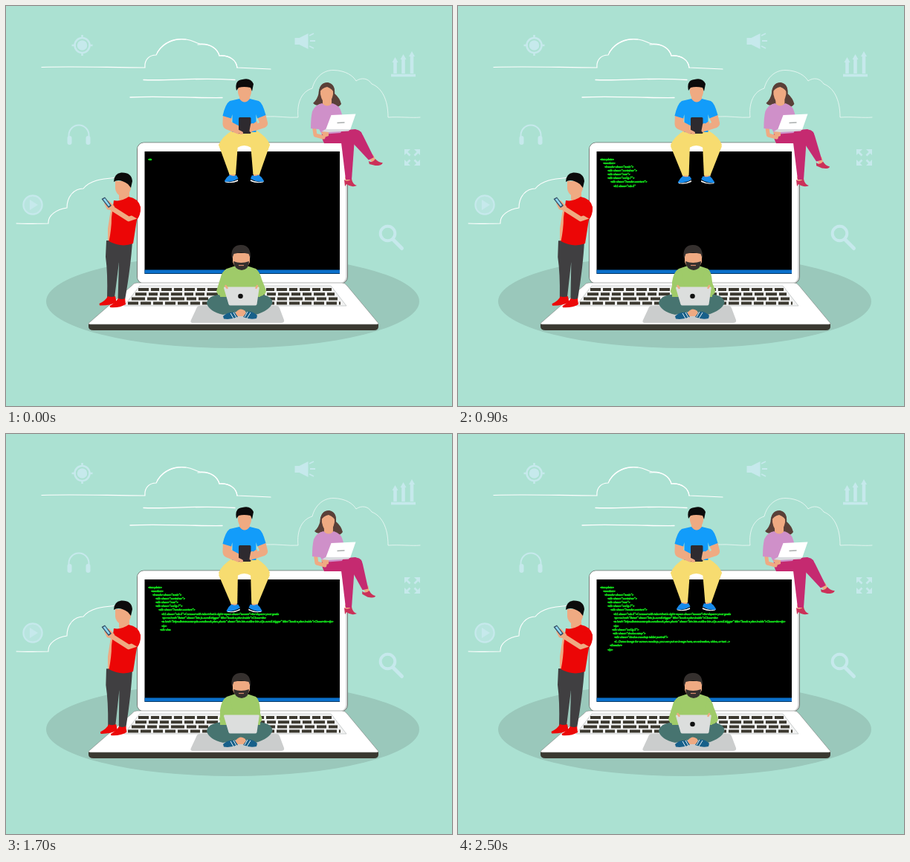
Recreate the animation shown at these times as an HTML page. Size 600x539 px, loop 2600 ms.

```html
<!DOCTYPE html>
<html lang="en">
<head>
<meta charset="utf-8">
<title>People around a laptop</title>
<style>
  html, body { margin: 0; width: 100%; height: 100%; overflow: hidden; background: #abe1d2; }
  svg { display: block; width: 100%; height: 100%; --k: 0; }
  .line { fill: none; stroke: #fff; stroke-linecap: round; stroke-linejoin: round; }
  .icon { fill: #c6e9ec; stroke: none; }
  .iconline { fill: none; stroke: #c6e9ec; }
  .skin { fill: #efaa82; }
  .skinline { fill: none; stroke: #efaa82; stroke-linecap: round; stroke-linejoin: round; }
  .keys { fill: none; stroke: #3b382f; stroke-width: 4; }
  .code { font: italic bold 4.2px "Liberation Sans", Arial, sans-serif; letter-spacing: -.36px; fill: #14e81c; stroke: #14e81c; stroke-width: .3px; white-space: pre; }
  .pants { fill: #c52a70; }
  .typing .mark { display: none; }
  .shinL { transform-origin: 291px 186px; transform: translateY(calc(var(--k) * 3.4px)) rotate(calc(var(--k) * -4deg)); }
  .shinR { transform-origin: 350px 186px; transform: translateY(calc(var(--k) * 3.4px)) rotate(calc(var(--k) * 4deg)); }
  .kick { transform-origin: 473px 175px; transform: rotate(calc(var(--k) * 18deg)); }
  .torso { transform: translateX(calc(var(--k) * 2.5px)); }
  .stance { transform-origin: 152px 318px; transform: rotate(calc(var(--k) * -1.2deg)); }
  .armL { transform: translateX(calc(var(--k) * 5px)); }
  .armR { transform: translateX(calc(var(--k) * -7px)); }
</style>
</head>
<body>
<svg id="stage" viewBox="0 0 600 539">
  <rect width="600" height="539" fill="#abe1d2"/>

  <!-- clouds -->
  <g class="line">
    <path stroke-width="1.2" d="M48 82.500C95 81 140 83 187 83C186 72 193 66 202 66C208 52 224 43 242 45C252 46 259 52 263 51C276 51 285 58 287 67C300 66 310 73 311 83L356 85"/>
    <path stroke-width="1.2" d="M204 62C212 49 226 43 242 45M258 52C274 50 284 57 287 67C301 66 310 73 311 83"/>
    <path stroke-width="1.3" d="M185 99.500C220 101 260 96 308 99.500M167 123C205 121 250 124 291 123.500"/>
    <path stroke-width="1" opacity=".65" d="M350 149C365 148 380 151 393 150C391 130 398 115 412 111C416 95 428 86 441 86.500C457 87 467 94 471 101C478 96 487 97 492 105C505 110 514 125 514 150C530 149 545 151 557 150"/>
    <path stroke-width="1.1" d="M14 293C30 294 42 293 57 293C56 282 68 274 82 272C82 256 92 246 104 246C114 234 130 233 150 231"/>
  </g>

  <!-- icons -->
  <g class="iconline" stroke-width="2.6">
    <circle cx="102.500" cy="53" r="10"/>
    <path d="M102.500 39v5M102.500 62v5M88.500 53h5M111.500 53h5"/>
    <circle cx="36" cy="268" r="12.500" stroke-width="2.400"/>
    <path d="M84.500 178v-4a13.500 13.500 0 0 1 27 0v4" stroke-width="2"/>
    <circle cx="513.500" cy="306.500" r="9.800" stroke-width="4"/>
    <path d="M521 315l11.500 11.500" stroke-width="5" stroke-linecap="round"/>
    <path d="M518 93.500h33" stroke-width="3.600"/>
    <path d="M523.500 91v-16M534.500 91v-20M546 91v-24" stroke-width="4.600"/>
    <path d="M408 40l6-3M409 47h7M408 54l6 3" stroke-width="1.800"/>
    <path d="M538 196l5.500 5.500M555 196l-5.500 5.500M538 213l5.500-5.500M555 213l-5.500-5.500" stroke-width="2.600"/>
  </g>
  <g class="icon">
    <circle cx="102.500" cy="53" r="6.800"/>
    <circle cx="36" cy="268" r="11.500" opacity=".5"/>
    <path d="M32 261l11 7-11 7z"/>
    <rect x="82.500" y="175" width="6" height="12" rx="3"/><rect x="107.500" y="175" width="6" height="12" rx="3"/>
    <path d="M388.500 43h6l12-6v21l-12-6h-6z"/>
    <path d="M519.500 76l4-7 4 7zM530.500 72l4-7 4 7zM542 68l4-7 4 7z"/>
    <path d="M536 193h8l-8 8zM557 193v8l-8-8zM536 215v-8l8 8zM557 215h-8l8-8z"/>
  </g>

  <ellipse cx="305" cy="398" rx="251" ry="63" fill="#9ac8bb"/>

  <!-- laptop -->
  <rect x="176.500" y="184" width="283" height="190" rx="9" fill="#d5d8d8" stroke="#6d706c" stroke-width=".9"/>
  <rect x="177" y="184.500" width="280" height="189" rx="8.500" fill="#fff"/>
  <rect x="186.500" y="196" width="262.500" height="165" fill="#000"/>
  <rect x="186.500" y="355.500" width="262.500" height="5" fill="#0b70cc"/>
  <path d="M111 428h390v4q0 5-6 5H118q-7 0-7-5z" fill="#3a3931"/>
  <path d="M176 373H452q4 0 7 4L501 427.500q0 1.500-3 1.500H114q-3 0-3-1.500L169 377q3-4 7-4z" fill="#fff" stroke="#7b7f7b" stroke-width=".6"/>
  <path d="M180 377H437L458 404H159z" fill="#f1f2f2" stroke="#bfc3c3" stroke-width=".8"/>
  <g class="keys">
    <path d="M178 382H438" stroke-dasharray="14 3 11 3"/>
    <path d="M174 388.200H442" stroke-dasharray="15 3 12 3 12 3"/>
    <path d="M169 394.400H446" stroke-dasharray="18 3 13 3 13 3"/>
    <path d="M164 400.600H450" stroke-dasharray="14 3 14 3 13 3"/>
  </g>
  <path d="M261 404H363q4 0 5 3l6 16q1 4-4 4H252q-5 0-3-4l7-15q1-4 5-4z" fill="#cbcdcd"/>

  <g id="code"></g>

  <!-- man on the left of the lid -->
  <g>
    <path class="skinline" stroke-width="5" d="M143 278L139.500 300V317"/>
    <g class="stance">
      <path fill="#403f41" d="M135 316L170 317Q168 350 160 396H150.500L152 345L146 393H136Q137 360 134 338Z"/>
      <path fill="#ec0808" d="M125.500 401Q134 397 137 391Q142 393 147 391L148.500 399Q140 404 126 403.500Z"/>
      <path fill="#ec0808" d="M139.500 404Q147 400 151 394Q156 396 160 394L161 402Q153 407 140 406Z"/>
    </g>
    <path class="skin" d="M152 248H166V262Q158 268 152 261Z"/>
    <path fill="#ec0606" d="M145 262Q155 264 165 257Q178 259 181 271Q181 280 176 288L171 320Q155 326 138.500 317Q142 300 142 285Z"/>
    <path class="skinline" stroke-width="6.500" d="M174 284L165 287L143 273"/>
    <path fill="#ec0606" d="M166 268Q180 262 181 273Q181 281 177 287L165 280Z"/>
    <path class="skin" d="M132 266L138 262L146 270L144 276L136 274Z"/>
    <path fill="#324c63" d="M128.500 260L133 257.500L142 269L138 272Z"/>
    <path fill="#8dd5f0" d="M130.500 260.500L133 259L140 268.500L138 270Z"/>
    <path class="skin" d="M147 236H168V246Q165 257 156 257Q148 254 147 246Z"/>
    <path fill="#0c0b0b" d="M145 237Q145 226 155 224.500Q169 224 170 236L168 245L164 240Q152 232 145 237Z"/>
  </g>

  <!-- man on top of the lid -->
  <g>
    <g class="shinL">
      <path class="skin" d="M300 224h8.500v7h-7.500z"/>
      <path fill="#f7dc70" d="M286 187Q292 178 312 186L309 227H300.500Z"/>
      <path fill="#fff" d="M294.500 236Q303 239 312 234V236Q304 239.500 295 237.500Z"/>
      <path fill="#168aeb" d="M294 235.500Q297 230 301 227.500Q305 230 310 228L312.500 232.500Q305 237.500 294 236.500Z"/>
    </g>
    <g class="shinR">
      <path class="skin" d="M333 224h8.500l-1 7h-7.500z"/>
      <path fill="#f7dc70" d="M355 187Q349 178 329 186L332.500 227H341Z"/>
      <path fill="#fff" d="M347 236Q338 239 329 234V236Q337 239.500 346 237.500Z"/>
      <path fill="#168aeb" d="M347 235.500Q344 230 340 227.500Q336 230 331 228L329 232.500Q336 237.500 347 236.500Z"/>
    </g>
    <path fill="#f7dc70" d="M304 168H337Q351 176 355 187L350 198L330 191Q325 188 320.500 188Q316 188 311 191L290 197L286 187Q291 176 304 168Z"/>
    <path class="skin" d="M314 118H328V127Q321 134 314 127Z"/>
    <path class="skin" d="M292 146L304 150L303 158L315 165L313 173L296 166Q291 163 291.500 158ZM349 145L338 150L341 157L328 163L329 170L348 164Q353 161 352 157Z"/>
    <path fill="#129cfa" d="M314 125Q321 134 328 125L340 128Q345 130 349.500 147L338 151.500L336.500 146V170H304.500V146L303 151.500L291.500 148Q295 132 301 128Z"/>
    <path class="skin" d="M303 156L316 163V173L303 169ZM338 155L327 162V170L339 167Z"/>
    <rect x="313" y="150" width="16.500" height="22" rx="1.500" fill="#2e2a2f"/>
    <path class="skinline" stroke-width="4" d="M312 168.500L317 171M331 160L329.500 168"/>
    <path class="skin" d="M312 106H330V117Q328 127 321 127.500Q314 127 312 117Z"/>
    <path fill="#0c0b0b" d="M310 114Q307 100 318 99Q329 96 333 105L331 115L329 110Q320 108 313 110Z"/>
  </g>

  <!-- woman on the corner of the lid -->
  <g>
    <path class="skin" d="M456 230h9v8h-8z"/>
    <path class="pants" d="M450 176L469 178L465 234H457Z"/>
    <path fill="#cb3159" d="M455 234Q459 238 465 233Q466 240 472 242Q465 245 458 240L456 243Z"/>
    <g class="kick">
      <path class="skin" d="M487 203l7-3 4 9-5 2z"/>
      <path class="pants" d="M464 172Q474 162 480 174L495 204L488 207.500L466 184Z"/>
      <path fill="#cb3159" d="M488 209Q493 212 497 206Q501 211 507 211Q506 215 497 215L489 213Z"/>
    </g>
    <path class="pants" d="M425 170Q445 168 470 166Q480 168 479 176Q477 183 468 185L428 185Q424 178 425 170Z"/>
    <g class="torso">
      <path class="skinline" stroke-width="5" d="M414 160L416 174L427 177"/>
      <path fill="#5a4038" d="M421 116Q422 103 433 103Q443 105 442 118Q449 124 451 132Q446 139 439 135L422 132Q418 136 413 131Q419 126 421 116Z"/>
      <path class="skin" d="M426 122H438V133Q431 139 426 133Z"/>
      <path fill="#cf90c9" d="M425 131Q432 138 439 131Q449 134 451 143L456 160L450 171L425 173L421 166L410 165Q410 150 412 142Q416 133 425 131Z"/>
      <path class="skin" d="M423 112Q431 104 440 113V119Q438 130 431 131Q425 130 423 119Z"/>
      <path fill="#5a4038" d="M420.500 118Q421 104 432 103.500Q443 105 442 119Q440 112 432 109Q425 110 420.500 118Z"/>
    </g>
    <path class="skin" d="M424 170l10-2v7l-6 2z"/>
    <path fill="#fff" d="M437.500 147L470.500 145.500L463 167H430Z"/>
    <path fill="#d9dcdf" d="M425 169L430 166H463L461 168.500L434 170Z"/>
    <path d="M445.500 157.500l10-.500" stroke="#a9adad" stroke-width="1.300"/>
  </g>

  <!-- man sitting in front -->
  <g>
    <path fill="#477470" d="M294 388Q272 389 270 400Q272 411 292 416L316 411L336 416Q355 410 358.500 400Q358 389 337 388Z"/>
    <path class="skin" d="M309 413Q315 405 322 411L323 418H309Z"/>
    <path fill="#17608a" d="M292 418Q298 412 308 413L312 419Q302 423 293 421.500ZM338 417Q332 411 324 412L319 419Q328 423 337 421Z"/>
    <path d="M302 414l4 7M306 413l4 7M329 413l-5 8M325 412l-4 7" stroke="#fff" stroke-width=".9"/>
    <path fill="#9fcb69" d="M309 350H324L336 354Q341 357 342 372V392H288V372Q290 358 297 354Z"/>
    <path class="armL" fill="#9fcb69" d="M297 354Q290 358 288 368L283 384Q284 390 291 391L304 389Z"/>
    <path class="armR" fill="#9fcb69" d="M336 354Q342 359 344 368L350 383Q350 389 343 391L329 389Z"/>
    <path class="skin" d="M311 346H322V351Q317 357 311 351Z"/>
    <path class="skin" d="M305 333H328V345Q325 354 316.500 354Q308 354 305 345Z"/>
    <path fill="#35302e" d="M306 344Q316 348 327 344Q327 355 317 356Q307 355 306 344Z"/>
    <path d="M313 349.500h7" stroke="#d98b6c" stroke-width="1.200"/>
    <path fill="#35302e" d="M304 341Q301 323 315 322Q330 321 329 341L326.500 334Q316 331 306.500 334Z"/>
    <path fill="#dcdedd" d="M294 378.500H339.500Q341 378.500 340.700 380L337.500 402Q337 403.500 335 403.500H302Q300 403.500 299.500 402L293 380Q293 378.500 294 378.500Z"/>
    <circle class="mark" cx="315.500" cy="391" r="3.300" fill="#111"/>
    <path class="skinline mark" stroke-width="2.500" d="M295.500 377l2 3M338 377l-1.500 3"/>
  </g>
</svg>
<script>
  const stage = document.getElementById('stage');
  const LOOP = 2600, STEP = 100, SWAY = 1300;

  // x, middle y, text
  const lines = [
    [191, 207, '<template>'],
    [195, 211.5, '<section>'],
    [197, 216.3, '<header class="main">'],
    [201, 221.3, '<div class="container">'],
    [201, 226.5, '<div class="row">'],
    [201, 231.8, '<div class="col-lg-7">'],
    [205, 237, '<div class="header-content">'],
    [209, 242.3, '<h1 class="mb-5">Connect with talent that is right <span class="accent">for</span> your goals'],
    [210, 247.6, '<p><a href="#start" class="btn js-scroll-trigger" title="book a plan inside">Closer</a>'],
    [209, 252.9, '<a href="https://www.example.com/book-plan-photo" class="btn btn-outline btn-xl js-scroll-trigger" title="book a plan inside">Closer</a></p>'],
    [209, 258.3, '</p>'],
    [207, 263.6, '<div class="col-lg-5">'],
    [208, 268.6, '<div class="device-wrap">'],
    [210, 273.8, '<div class="device-mockup tablet portrait">'],
    [210, 279.5, '<!-- Demo image for screen mockup, you can put an image here, an animation, video, or text -->'],
    [204, 285, '</header>'],
    [201, 290.5, '</p>']
  ];

  // time, lines typed so far
  const pace = [[0, .3], [500, 4.4], [900, 7.17], [1400, 9.4], [1700, 11.4], [2200, 14.28], [2500, 17]];

  const rows = lines.map(([x, y]) => {
    const row = document.createElementNS('http://www.w3.org/2000/svg', 'text');
    row.setAttribute('class', 'code');
    row.setAttribute('x', x);
    row.setAttribute('y', y + 1.4);
    document.getElementById('code').append(row);
    return row;
  });

  function typedAt(t) {
    const i = pace.findIndex(p => p[0] > t);
    if (i < 0) return lines.length;
    const [t0, a] = pace[i - 1], [t1, b] = pace[i];
    return a + (b - a) * (t - t0) / (t1 - t0);
  }

  function draw(t) {
    const k = .5 - .5 * Math.cos(2 * Math.PI * (t + 50) / SWAY);
    stage.style.setProperty('--k', k.toFixed(4));
    stage.classList.toggle('typing', k > .7);
    const typed = typedAt(t);
    rows.forEach((row, i) => {
      const text = lines[i][2];
      const part = Math.min(1, Math.max(0, typed - i));
      row.textContent = text.slice(0, Math.round(part * text.length));
    });
  }

  const start = performance.now();
  function tick() {
    const t = (performance.now() - start) % LOOP;
    draw(Math.floor(t / STEP) * STEP);
    requestAnimationFrame(tick);
  }
  draw(0);
  requestAnimationFrame(tick);
</script>
</body>
</html>
```
